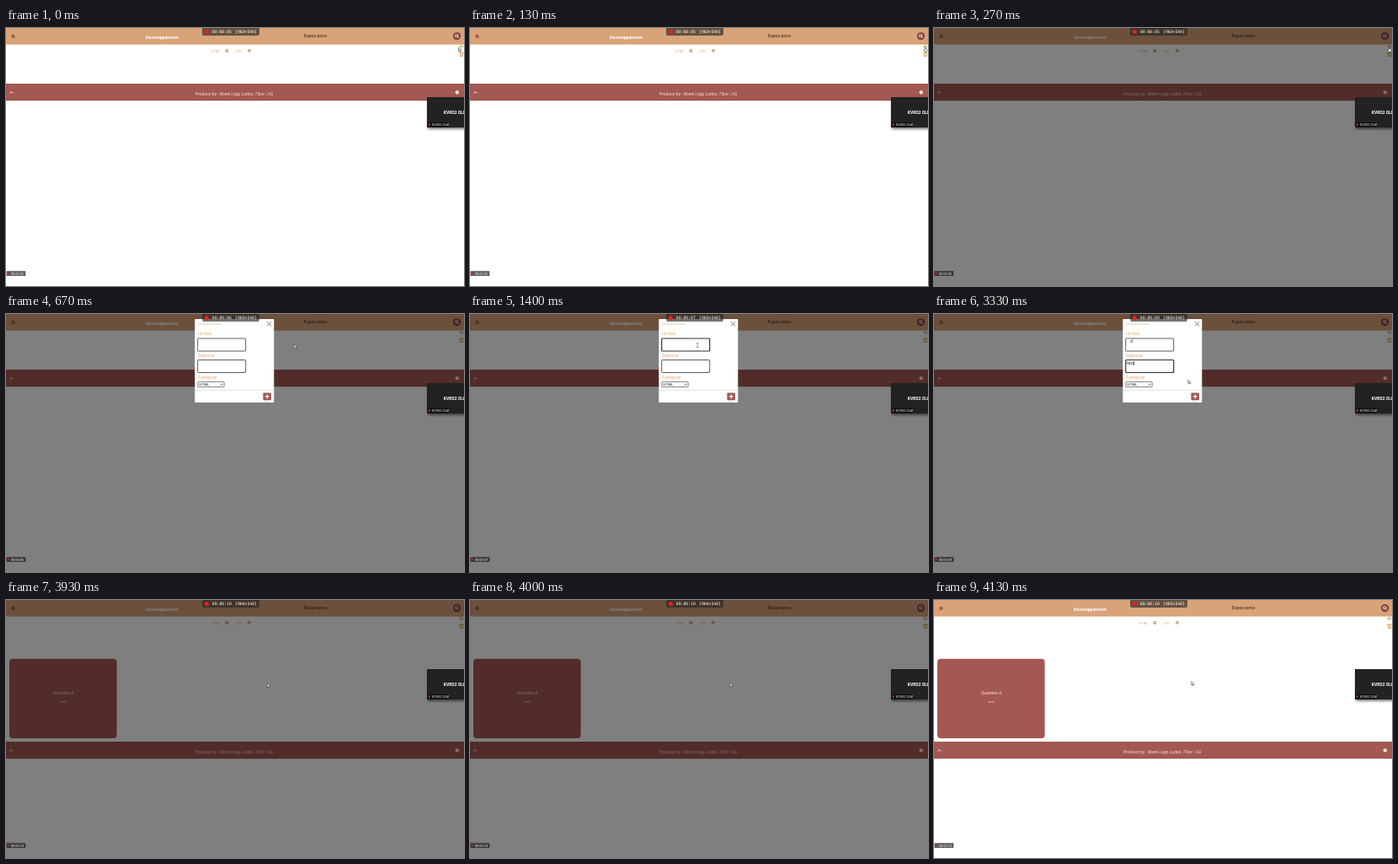
Animation, 544 px wide and 306 px high, one loop 4190 ms. Source, as an HTML page:

```html
<!DOCTYPE html>
<html lang="fr">
<head>
<meta charset="utf-8">
<title>Fiche</title>
<style>
  html, body { margin: 0; width: 100%; height: 100%; overflow: hidden; background: #fff; }
  svg { display: block; width: 544px; height: 306px; }
  text { font: 5px Roboto, Arial, sans-serif; white-space: pre; }
  .mid { text-anchor: middle; }
  .mono { font: 4.8px "DejaVu Sans Mono", monospace; fill: #fff; }
  .label { font-size: 5.2px; fill: #e5aa6d; }
  .typed { font-size: 4.8px; fill: #222; }
  .line { fill: none; stroke-linecap: round; stroke-linejoin: round; }
</style>
</head>
<body>
<svg viewBox="0 0 544 306">
  <defs>
    <filter id="soft" x="-20%" y="-20%" width="140%" height="150%"><feGaussianBlur stdDeviation="1.6"/></filter>
  </defs>
  <rect width="544" height="306" fill="#fff"/>

  <!-- page -->
  <rect width="544" height="19.6" fill="#d8a378"/>
  <path d="M5.6 9.5 8.4 7 11.2 9.5H10.4V12H6.4V9.5Z" fill="#a2634e"/>
  <text class="mid" x="185.3" y="13.4" fill="#fff" style="font-size:5.5px;font-weight:700">Developpement</text>
  <text class="mid" x="367.5" y="11.2" fill="#33251c" style="font-size:4.6px">Espace perso</text>
  <circle cx="535.6" cy="9.6" r="4.7" fill="#8e4a45"/>
  <g class="line" stroke="#fff" stroke-width=".8"><circle cx="535.2" cy="9.1" r="1.5"/><path d="M536.4 10.3 537.6 11.5"/></g>
  <g fill="#d5b485">
    <text x="243.5" y="28.8" fill="#d5b485" style="font-size:4px">HTML</text>
    <rect x="260.5" y="25" width="3.6" height="4"/>
    <text x="272.3" y="28.8" fill="#d5b485" style="font-size:4px">CSS</text>
    <circle cx="289" cy="26.8" r="2.1"/>
  </g>
  <g class="line" stroke="#cfaa55" stroke-width="1">
    <path d="M538.3 22H543.5M540.9 19.5V24.5"/>
    <path d="M538.4 29.4H543.4M539.2 30.6V33.5H542.6V30.6M540.1 28.7H541.7M540.9 30.8V33" stroke-width=".9"/>
  </g>
  <g id="card">
    <rect x="4" y="69.7" width="127.6" height="94.4" rx="4" fill="#a35851"/>
    <text class="mid" x="68" y="112" fill="#f5e6e2">Question d</text>
    <text class="mid" x="68" y="122" fill="#f0dcd7" style="font-size:4.2px">test</text>
  </g>
  <g id="foot">
    <rect y="66" width="544" height="20" fill="#a35851"/>
    <rect y="85.4" width="544" height=".8" fill="#914c46"/>
    <path class="line" d="M4.6 77.2 6.3 75.5 8 77.2" stroke="#fff" stroke-width="1"/>
    <text class="mid" x="271" y="79.8" fill="#f2dfda" style="font-size:5.1px">Produce by : <tspan font-style="italic">Marel Lagy, Ludan, Tibor | AG</tspan></text>
    <circle cx="535.8" cy="76.3" r="2.2" fill="#f2dfda"/>
  </g>

  <rect id="shade" width="544" height="306"/>

  <!-- dialog -->
  <g id="modal">
    <rect x="224.3" y="6" width="94" height="99" rx=".8" fill="#fff"/>
    <text x="228" y="12.8" fill="#d3bd8e" style="font-size:4.4px">Nouvelle fiche</text>
    <path class="line" d="M310.4 9.4 314.8 13.8M314.8 9.4 310.4 13.8" stroke="#555" stroke-width=".8"/>
    <text class="label" x="228" y="25.4">Le titre</text>
    <rect id="box1" x="227.7" y="29" width="57" height="15" rx=".8" fill="#fff" stroke="#333"/>
    <text id="text1" class="typed" x="233.3" y="34.3"></text>
    <text class="label" x="228" y="51.4">Réponse</text>
    <rect id="box2" x="227.7" y="54.5" width="57" height="15" rx=".8" fill="#fff" stroke="#333"/>
    <path class="line" d="M282 68.8 284 66.8M283.2 68.8 284 68" stroke="#777" stroke-width=".4"/>
    <text id="text2" class="typed" x="229" y="60.3"></text>
    <text class="label" x="228" y="77">Catégorie</text>
    <rect x="227.7" y="80.5" width="31.5" height="6" rx="1" fill="#fff" stroke="#555" stroke-width=".7"/>
    <text x="229.2" y="85.2" fill="#222" style="font-size:4.4px">HTML</text>
    <path class="line" d="M255.2 82.9 256.4 84.2 257.6 82.9" stroke="#222" stroke-width=".7"/>
    <rect x="224.3" y="90.4" width="94" height=".6" fill="#d5d5d5"/>
    <rect x="305.4" y="93.4" width="9.6" height="8.8" rx="1" fill="#9b5350"/>
    <path d="M307.6 97.8H312.8M310.2 95.2V100.4" stroke="#fff" stroke-width="1.2"/>
    <path id="caret" d="M0 0V5" stroke="#111" stroke-width=".6"/>
  </g>

  <!-- recorder panels -->
  <rect x="233" y="-3" width="68" height="12" rx="2" fill="#282523" fill-opacity=".65"/>
  <circle cx="238.3" cy="4.5" r="2.5" fill="#ee1c1c"/>
  <text id="clock" class="mono" x="244.8" y="6.3"></text>
  <text class="mono" x="272" y="6.2">[960×540]</text>
  <rect x="501" y="84" width="46" height="36" fill="#000" opacity=".5" filter="url(#soft)"/>
  <rect x="500" y="82" width="44" height="36" fill="#222"/>
  <text x="519.8" y="101.8" fill="#fff" style="font-size:5px;font-weight:700">KVRD2 OLMA</text>
  <rect x="500.5" y="111.8" width="25" height="5.7" fill="#111"/>
  <rect x="502" y="112.8" width="1.4" height="3.4" rx=".7" fill="#e03434"/>
  <text x="505.8" y="116.2" fill="#ddd" style="font-size:3.7px">KVRD2 OLM</text>
  <rect x=".5" y="288.2" width="22.8" height="5.9" rx=".6" fill="#1c1c1c" fill-opacity=".72"/>
  <circle cx="3" cy="291.1" r="1.1" fill="#b23030"/>
  <text id="clock2" x="5.8" y="292.7" fill="#eee" style="font-size:4px"></text>

  <g id="cursor">
    <path id="arrow" d="M0 0V4.6L1.1 3.6 1.8 5.2 2.6 4.8 1.9 3.3H3.3Z" fill="#fff" stroke="#222" stroke-width=".5"/>
    <path id="hand" d="M-.5 0Q0-.6.5 0V1.7L2 2.1 2.4 3.8 1.6 5.2H-.6L-1.8 3.1-1.2 2.6-.5 3.2Z" fill="#fff" stroke="#222" stroke-width=".5"/>
    <path id="beam" class="line" d="M-.9-2.3H.9M0-2.3V2.3M-.9 2.3H.9" stroke="#444" stroke-width=".5"/>
  </g>
</svg>
<script>
const LOOP = 4190, STEP = 200 / 3;
const el = {};
document.querySelectorAll('[id]').forEach(e => el[e.id] = e);

// rows: time, value, value...
const path = [
  [0, 537.5, 23], [130, 540.8, 23], [330, 540.8, 23], [530, 440, 32],
  [730, 300, 38], [930, 270.2, 37], [2200, 270.2, 37], [2400, 276.5, 59],
  [2670, 276.5, 59], [2930, 301.8, 78], [3330, 301.8, 78], [3600, 308, 95],
  [3800, 310.5, 99], [3930, 310.5, 99], [4130, 305.8, 96.5]
];
const dialog = [
  [0, 0, -50], [270, 0, -50], [470, .8, -14], [600, 1, 0],
  [3800, 1, 0], [3870, .5, -12], [3930, 0, -50]
];
const dim = [[0, 0], [200, 0], [270, .5], [4000, .5], [4130, 0]];
const seconds = [[0, 5], [400, 6], [730, 7], [1870, 8], [2800, 9], [3870, 10]];
const first = [[0, ''], [1870, 'd']];
const second = [[0, ''], [2600, 't'], [2870, 'te'], [3130, 'tes'], [3330, 'test']];
const pointer = [
  [0, 'arrow'], [70, 'hand'], [330, 'arrow'], [800, 'beam'],
  [2800, 'arrow'], [3600, 'hand'], [3930, 'arrow']
];

function held(rows, t) {
  return rows.filter(r => r[0] <= t).pop()[1];
}

function blend(rows, t) {
  const i = rows.findIndex(r => r[0] > t);
  if (i < 0) return rows[rows.length - 1].slice(1);
  const a = rows[i - 1], b = rows[i], k = (t - a[0]) / (b[0] - a[0]);
  return a.slice(1).map((v, j) => v + (b[j + 1] - v) * k);
}

function move(node, x, y) {
  node.setAttribute('transform', `translate(${x} ${y})`);
}

function show(node, on) {
  node.style.display = on ? '' : 'none';
}

function draw(t) {
  const added = t >= 3870;
  show(el.card, added);
  move(el.foot, 0, added ? 102 : 0);
  el.shade.setAttribute('opacity', blend(dim, t)[0]);

  const [alpha, lift] = blend(dialog, t);
  el.modal.setAttribute('opacity', alpha);
  move(el.modal, 0, lift);

  const lower = t >= 2470;
  el.box1.setAttribute('stroke-width', t >= 1000 && !lower ? 1.2 : .8);
  el.box2.setAttribute('stroke-width', lower ? 1.2 : .8);
  el.text1.textContent = held(first, t);
  el.text2.textContent = held(second, t);
  const field = lower ? el.text2 : el.text1;
  const start = lower ? 229 : 233.3;
  move(el.caret, start + field.getComputedTextLength() + .4, lower ? 56 : 30.2);
  show(el.caret, t >= 1870);

  const time = '00:00:' + String(held(seconds, t)).padStart(2, '0');
  el.clock.textContent = el.clock2.textContent = time;

  const [x, y] = blend(path, t);
  move(el.cursor, x, y);
  const kind = held(pointer, t);
  for (const name of ['arrow', 'hand', 'beam']) show(el[name], name === kind);
}

function tick() {
  const t = performance.now() % LOOP;
  const n = Math.floor(t / STEP + .06);
  draw(Math.round(n * STEP / 10) * 10);
  requestAnimationFrame(tick);
}
tick();
</script>
</body>
</html>
```
